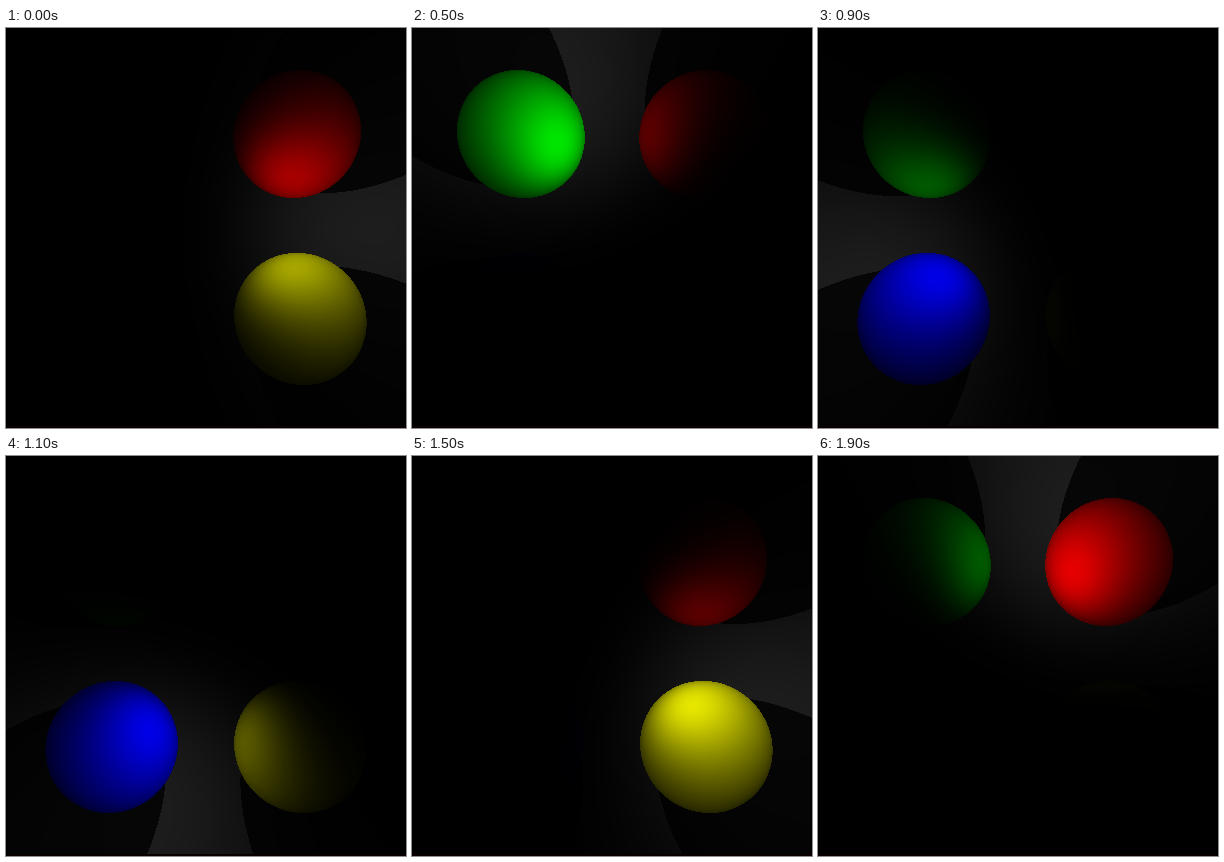
An HTML page with a canvas for the animation above (2000 ms loop, 400 px wide and 400 px high).

```html
<!DOCTYPE html>
<html lang="en">
<head>
<meta charset="utf-8">
<title>Orbiting spotlight</title>
<style>
  html, body { margin: 0; width: 100%; height: 100%; overflow: hidden; background: #000; }
  canvas { display: block; width: 100vmin; height: 100vmin; }
</style>
</head>
<body>
<canvas id="stage" width="400" height="400"></canvas>
<script>
const SIZE = 400, STEP_MS = 100, STEPS = 20, TURN = Math.PI / 8;
const FOCAL = 385, PITCH = 4 * Math.PI / 180;
const SPREAD = 90.3, RADIUS = 62.5, WALL_Z = -68;
const LIGHT_Z = 100, LIGHT_ORBIT = 20, SPOT_TILT = 20 * Math.PI / 180;
const GAIN = 1.06, SHADOW = 0.2;

const WALL = { color: [54, 54, 54], wrap: 0 };
const spheres = [
  [1, 1, [255, 0, 0]],
  [-1, 1, [0, 255, 0]],
  [-1, -1, [0, 0, 255]],
  [1, -1, [255, 255, 0]]
].map(([sx, sy, color]) => ({ x: sx * SPREAD, y: sy * SPREAD, color, wrap: 1 }));

const sinP = Math.sin(PITCH), cosP = Math.cos(PITCH);
const eye = { y: -FOCAL * sinP - 3 * cosP, z: FOCAL * cosP - 3 * sinP };

// First surface seen through a pixel: position, normal, material.
function trace(col, row) {
  const sx = col + 0.5 - SIZE / 2, sy = SIZE / 2 - row - 0.5;
  const len = Math.hypot(sx, sy, FOCAL);
  const dx = sx / len;
  const dy = (sy * cosP + FOCAL * sinP) / len;
  const dz = (sy * sinP - FOCAL * cosP) / len;
  let dist = (WALL_Z - eye.z) / dz, body = WALL;
  for (const s of spheres) {
    const ox = -s.x, oy = eye.y - s.y, oz = eye.z;
    const b = ox * dx + oy * dy + oz * dz;
    const disc = b * b - (ox * ox + oy * oy + oz * oz - RADIUS * RADIUS);
    if (disc > 0 && -b - Math.sqrt(disc) < dist) {
      dist = -b - Math.sqrt(disc);
      body = s;
    }
  }
  const x = dx * dist, y = eye.y + dy * dist, z = eye.z + dz * dist;
  const n = body === WALL
    ? [0, 0, 1]
    : [(x - body.x) / RADIUS, (y - body.y) / RADIUS, z / RADIUS];
  return { x, y, z, n, body };
}

const hits = [];
for (let row = 0; row < SIZE; row++)
  for (let col = 0; col < SIZE; col++) hits.push(trace(col, row));

// True when a sphere stands between the wall point and the light.
function blocked(lx, ly, lz, light) {
  return spheres.some(s => {
    const cx = s.x - light.x, cy = s.y - light.y, cz = -LIGHT_Z;
    const along = -(cx * lx + cy * ly + cz * lz);
    return along > 0 &&
      cx * cx + cy * cy + cz * cz - along * along < RADIUS * RADIUS;
  });
}

function shade(hit, light, aim) {
  let lx = light.x - hit.x, ly = light.y - hit.y, lz = LIGHT_Z - hit.z;
  const d = Math.hypot(lx, ly, lz);
  lx /= d; ly /= d; lz /= d;
  const spot = -(lx * aim.x + ly * aim.y + lz * aim.z);
  if (spot <= 0) return 0;
  const { n, body } = hit;
  const facing = n[0] * lx + n[1] * ly + n[2] * lz;
  const diffuse = Math.max(0, (facing + body.wrap) / (1 + body.wrap));
  const shadow = body === WALL && blocked(lx, ly, lz, light) ? SHADOW : 1;
  return GAIN * diffuse * spot ** 4 * shadow;
}

const ctx = document.getElementById("stage").getContext("2d");
const image = ctx.createImageData(SIZE, SIZE);

function render(step) {
  const a = step * TURN, c = Math.cos(a), s = Math.sin(a);
  const light = { x: -LIGHT_ORBIT * c, y: -LIGHT_ORBIT * s };
  const flat = Math.cos(SPOT_TILT);
  const aim = { x: flat * c, y: flat * s, z: -Math.sin(SPOT_TILT) };
  const px = image.data;
  hits.forEach((hit, i) => {
    const k = shade(hit, light, aim), rgb = hit.body.color;
    for (let ch = 0; ch < 3; ch++) px[i * 4 + ch] = rgb[ch] * k;
    px[i * 4 + 3] = 255;
  });
  ctx.putImageData(image, 0, 0);
  ctx.fillStyle = "#0a0000";
  ctx.fillRect(0, SIZE - 2, SIZE, 2);
}

let shown = -1;
const start = performance.now();
function tick() {
  const step = Math.floor((performance.now() - start) / STEP_MS) % STEPS;
  if (step !== shown) render(shown = step);
  requestAnimationFrame(tick);
}
tick();
</script>
</body>
</html>
```
